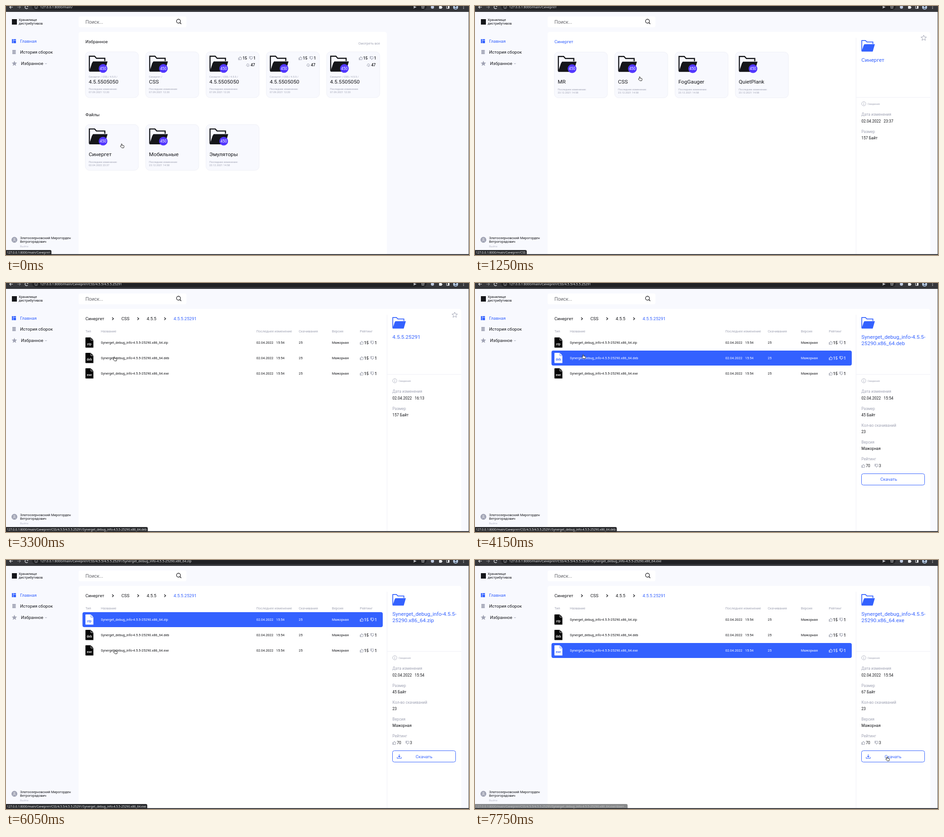
An HTML page with a canvas that plays this animation: 1020x549 px, repeating every 8 s.

```html
<!DOCTYPE html>
<html lang="ru">
<head>
<meta charset="utf-8">
<style>
html, body { margin: 0; width: 100%; height: 100%; overflow: hidden; background: #f8f9fe; }
canvas { display: block; width: 1020px; height: 549px; }
</style>
</head>
<body>
<canvas id="stage" width="1020" height="549"></canvas>
<script>
const ctx = document.getElementById('stage').getContext('2d');
const LOOP = 8000;
const BLUE = '#3361ff', INK = '#15161a', GREY = '#a0a3b4', LINE = '#eff0f7', PALE = '#f8f9fe', VIOLET = '#5237ff';
const ROOT = '127.0.0.1:8000/main/';
const SYN = ROOT + 'Синергет', CSS_DIR = SYN + '/CSS', VER = CSS_DIR + '/4.5.5', BUILD = VER + '/4.5.5.25291';
const TYPES = ['zip', 'deb', 'exe'];
const fileName = type => `Synerget_debug_info-4.5.5-25290.x86_64.${type}`;
const filePath = type => `${BUILD}/${fileName(type)}`;

// Each list holds hard changes: [start time, ...values].
const pages = [
  [0, { home: true, url: ROOT }],
  [600, { crumbs: ['Синергет'], url: SYN, time: '23:37', cards: ['MR', 'CSS', 'FogGauger', 'QuietPlank'], changed: '23.12.2021 14:58' }],
  [2300, { crumbs: ['Синергет', 'CSS'], url: CSS_DIR, time: '15:46', latest: true, cards: ['4.5.5'], changed: '02.04.2022 15:47' }],
  [2500, { crumbs: ['Синергет', 'CSS', '4.5.5'], url: VER, time: '15:47', latest: true, cards: ['4.5.5.25291'], changed: '02.04.2022 16:13' }],
  [3300, { url: BUILD, time: '16:13' }],
  [4150, { url: BUILD, time: '15:54', file: 'deb', size: '45', plainButton: true }],
  [4400, { url: filePath('deb'), time: '15:54', file: 'deb', size: '45' }],
  [5350, { url: filePath('zip'), time: '15:54', file: 'zip', size: '45' }],
  [6400, { url: filePath('exe'), time: '15:54', file: 'exe', size: '67' }]
];
const cursors = [
  [0, 251.5, 303, 'hand'], [650, 253, 303, 'arrow'], [1250, 359.5, 155, 'hand'],
  [2300, 235.5, 162, 'hand'], [3700, 235.5, 160, 'hand'], [3900, 235, 157, 'hand'],
  [4750, 241, 138, 'hand'], [5600, 243.5, 150, 'hand'], [5800, 238.5, 186, 'hand'],
  [6050, 236.5, 197, 'hand'], [7000, 676, 329, 'arrow'], [7250, 828.5, 363, 'arrow'],
  [7500, 907, 419, 'arrow'], [7750, 904.5, 433, 'hand']
];
const statuses = [
  [0, SYN, 1], [1100, CSS_DIR, 1], [2300, VER, 1], [2500, BUILD, 1], [3300, filePath('deb'), 1],
  [4750, filePath('zip'), 1], [5800, filePath('exe'), 1], [7250, filePath('exe'), 0.55],
  [7500, '', 0], [7750, filePath('exe') + '/down...', 0.55]
];
const current = (list, t) => list.filter(item => item[0] <= t).pop();

// y is the middle of the capital letters.
function text(str, x, y, size, color = INK, { align = 'left', weight = 400, family = 'Roboto' } = {}) {
  ctx.font = `${weight} ${size}px ${family}, sans-serif`;
  ctx.textAlign = align;
  ctx.fillStyle = color;
  ctx.fillText(str, x, y + size * 0.355);
  return ctx.measureText(str).width;
}
function rect(x, y, w, h, color) {
  ctx.fillStyle = color;
  ctx.fillRect(x, y, w, h);
}
function box(x, y, w, h, r, fill, stroke) {
  ctx.beginPath();
  ctx.roundRect(x, y, w, h, r);
  paint(fill, stroke);
}
function paint(fill, stroke, width = 1) {
  if (fill) { ctx.fillStyle = fill; ctx.fill(); }
  if (stroke) { ctx.strokeStyle = stroke; ctx.lineWidth = width; ctx.stroke(); }
}
function disc(x, y, r, fill, stroke, width) {
  ctx.beginPath();
  ctx.arc(x, y, r, 0, Math.PI * 2);
  paint(fill, stroke, width);
}
function shape(d, x, y, { fill, stroke, width = 1, sx = 1, sy = sx } = {}) {
  const path = new Path2D(d);
  ctx.save();
  ctx.translate(x, y);
  ctx.scale(sx, sy);
  if (fill) { ctx.fillStyle = fill; ctx.fill(path); }
  if (stroke) { ctx.strokeStyle = stroke; ctx.lineWidth = width; ctx.stroke(path); }
  ctx.restore();
}
function star(x, y, r, fill, stroke) {
  ctx.beginPath();
  for (let i = 0; i < 10; i++) {
    const a = i * Math.PI / 5 - Math.PI / 2, d = i % 2 ? r * 0.45 : r;
    ctx.lineTo(x + d * Math.cos(a), y + d * Math.sin(a));
  }
  ctx.closePath();
  paint(fill, stroke);
}
function folder(x, y, color, scale = 1) {
  shape('M1.5 34V1.5H13L17 6H35.5V12', x, y, { stroke: color, width: 2.4, sx: scale });
  shape('M9.5 13H41.5L35 35.5H1L7 17Z', x, y, { fill: color, sx: scale });
}
function thumb(x, y, down, color) {
  shape('M.5 3.5H2.2V7.7H.5ZM2.2 3.8L4 .5Q5.5.4 5 3H7.7L7 7.5H2.2', x, down ? y + 4 : y - 4,
    { stroke: color, width: 0.75, sx: 1, sy: down ? -1 : 1 });
}
function rating(x, y, up, down, color, iconColor, weight = 500, gap = 24) {
  thumb(x, y, false, iconColor);
  text(up, x + 9.6, y, 8.5, color, { weight });
  thumb(x + gap, y, true, iconColor);
  text(down, x + gap + 9.4, y, 8.5, color, { weight });
}

function drawBrowser(url) {
  rect(0, 0, 1020, 13, '#35363a');
  box(57, -10, 870, 19, 9, '#202124');
  const white = { stroke: '#e8eaed', width: 1.2 };
  shape('M8 0H1M4-3L1 0L4 3', 7, 2.5, white);
  shape('M0 0H7M4-3L7 0L4 3', 25, 2.5, { stroke: '#85878b', width: 1.1 });
  shape('M3 2A3.4 3.4 0 1 1 3-2M3.3-4V-1.5H.8', 45, 2.5, white);
  disc(66.5, 2.5, 3.3, null, '#b5b7bb', 0.8);
  rect(66.1, 2, 0.9, 2.5, '#b5b7bb');
  text(url, 75, 2.7, 7.24, '#e1e3e6', { family: '"Noto Sans"' });
  shape('M0-3L7 0L0 3L1 0Z', 897.5, 2.5, { fill: '#c4c6ca' });
  star(918.5, 2.5, 3.6, null, '#c4c6ca');
  disc(939.5, 2.5, 3.5, '#bfcbe2');
  box(954, 0, 6, 6, 1, '#e8eaed');
  disc(957, 0, 1.5, '#e8eaed');
  disc(960, 3, 1.5, '#e8eaed');
  box(970.5, -0.5, 6, 6, 0.5, null, '#e8eaed');
  rect(973.5, 0, 3, 5, '#e8eaed');
  disc(990.5, 2.5, 5.5, '#b9cce3');
  disc(990.5, 1, 1.9, '#39465c');
  shape('M-3.5 3Q0-1 3.5 3Z', 990.5, 3.5, { fill: '#39465c' });
  for (const y of [0, 2.7, 5.4]) disc(1008, y, 0.8, '#e8eaed');
}

function drawSidebar() {
  rect(13, 29, 11, 12, INK);
  text('Хранилище', 28, 30.8, 7.44);
  text('дистрибутивов', 28, 38, 7.44);
  rect(13, 73, 2.6, 9, BLUE);
  rect(16.4, 73, 5.6, 2.4, BLUE);
  rect(16.4, 76.2, 5.6, 5.8, BLUE);
  text('Главная', 31, 77.5, 9.6, BLUE);
  for (let i = 0; i < 3; i++) rect(14, 97 + i * 3.2, 7.5, 2.6, GREY);
  text('История сборок', 31, 101.5, 9.6);
  star(18.5, 127, 6.2, GREY);
  text('Избранное', 33, 127, 9.6);
  shape('M-2-1L0 1L2-1', 88, 127, { stroke: GREY });
  disc(18.5, 515.5, 6.4, GREY);
  disc(18.5, 513.8, 1.7, null, '#fff', 0.8);
  shape('M-3 2.3Q-2.5 0 0 0T3 2.3', 18.5, 516.7, { stroke: '#fff', width: 0.8 });
  text('Златоозерновский Мирогорден', 31, 511, 7.5);
  text('Ветрогорадович', 31, 519.3, 7.5);
  text('Выйти', 31, 529.5, 6, '#b7b9c8');
}

function drawSearch() {
  box(160, 23, 237.5, 24, 4, '#fff');
  text('Поиск...', 175, 35, 10.5, '#66676d');
  disc(380, 33.5, 4.3, null, INK, 1.2);
  shape('M3 3L6 6.3', 380, 33.5, { stroke: INK, width: 1.3 });
}

function drawCard(col, y, title, changed, { path, rated } = {}) {
  const x = 174.8 + col * 132.9;
  box(x, y, 117, 101, 9, PALE, LINE);
  folder(x + 7.4, y + 8.3, INK);
  disc(x + 39, y + 36.7, 9.6, VIOLET);
  text('450', x + 39, y + 36.8, 8.4, '#fff', { align: 'center' });
  if (path) text(path, x + 7.4, y + 55, 5.84, GREY);
  text(title, x + 7.4, y + 65.5, 11.69);
  text('Последнее изменение:', x + 7.4, y + 82.4, 5.84, GREY);
  text(changed, x + 7.4, y + 89.3, 5.84, GREY);
  if (rated) {
    rating(x + 71, y + 14, '15', '1', INK, '#85889a');
    shape('M2 2.5H1.7Q-.5 1.5 1.3-.3Q2-3.5 4.7-2.5Q6.4-1.8 6.2-.2Q8.6.8 6.5 2.5H6M4 0V3.7M2.8 2.6L4 3.8L5.2 2.6',
      x + 88.3, y + 29, { stroke: '#85889a', width: 0.75 });
    text('47', x + 98.3, y + 29.2, 8.5, INK, { weight: 500 });
  }
}

function drawHome() {
  text('Избранное', 175, 79, 9.6);
  text('Смотреть все', 824, 82.7, 7.44, GREY, { align: 'right' });
  for (let i = 0; i < 5; i++) {
    const isDir = i === 1;
    drawCard(i, 101, isDir ? 'CSS' : '4.5.5505050', '07.09.2021 12:20',
      { path: isDir ? 'Синергет /' : 'Синергет / CSS / 4.5.5 /', rated: i > 1 });
  }
  text('Файлы', 175, 240, 9.6);
  drawCard(0, 261.3, 'Синергет', '02.04.2022 23:37');
  drawCard(1, 261.3, 'Мобильные', '23.12.2021 14:58');
  drawCard(2, 261.3, 'Эмуляторы', '23.12.2021 14:58');
}

function drawCrumbs(crumbs) {
  let x = 175;
  crumbs.forEach((name, i) => {
    const last = i === crumbs.length - 1;
    x += text(name, x, 78.8, 9.6, last ? BLUE : INK);
    if (!last) shape('M-1.5-2.7L1.5 0L-1.5 2.7', x + 19, 78.7, { stroke: INK, width: 1.3 });
    x += 38;
  });
}

function drawTable(selected) {
  const heads = { 175: 'Тип', 209: 'Название', 551.5: 'Последнее изменение', 645: 'Скачивания', 718: 'Версия', 779.5: 'Рейтинг' };
  for (const x in heads) text(heads[x], +x, 106, 7.44, GREY);
  TYPES.forEach((type, i) => {
    const y = 131.6 + i * 34, on = type === selected, color = on ? '#fff' : INK;
    if (on) box(168.5, y - 16.6, 661.5, 33, 4, BLUE);
    shape('M1 0H12L17.5 6V22.5H1Q0 22.5 0 21.5V1Q0 0 1 0Z', 175, y - 11.5, { fill: on ? '#fff' : '#050505' });
    shape('M12 0V6H17.5', 175, y - 11.5, { stroke: on ? BLUE : '#fff', width: 0.8 });
    text(type, 183.5, y + 2.7, 7, on ? BLUE : '#fff', { align: 'center', weight: 500 });
    text(fileName(type), 209, y, 7.44, color);
    text('02.04.2022', 551.5, y, 7.44, color);
    text('15:54', 595, y, 7.44, color);
    text('25', 645, y, 7.44, color);
    text('Мажорная', 718, y, 7.44, color);
    rating(779.5, y, '15', '1', color, on ? '#fff' : '#85889a', 500, 23.3);
  });
}

function drawDetails(page, title) {
  rect(839, 70, 1, 477, LINE);
  rect(839, 201, 164, 1, LINE);
  folder(851, 75, BLUE, 0.72);
  if (page.file) {
    text('Synerget_debug_info-4.5.5-', 851.3, 119.3, 11.69, BLUE);
    text('25290.x86_64.' + page.file, 851.3, 133, 11.69, BLUE);
  } else {
    star(988.5, 70.5, 6.4, null, GREY);
    text(title, 851.3, 119.3, 11.69, BLUE);
  }
  if (page.latest) {
    text('Последняя версия', 851.3, 160, 8.5);
    text('4.5.5.25291', 851.3, 173.3, 8.5, BLUE);
    shape('M3 1H.5V6.5H6V4M4 .5H6.5V3M6.5.5L3 4', 898, 169.5, { stroke: BLUE });
    text('12.08.2021', 851.3, 183.3, 5.84, GREY);
  }
  disc(856.5, 215.5, 4.6, null, GREY, 0.8);
  rect(856.1, 215, 0.9, 3, GREY);
  rect(856.1, 213, 0.9, 1, GREY);
  text('Сведения', 865, 215.7, 5.84, GREY);
  const field = (label, value, y) => {
    text(label, 851.3, y, 8.5, GREY);
    text(value, 851.3, y + 14.4, 8.5);
  };
  field('Дата изменения', '02.04.2022', 239.3);
  text(page.time, 900.3, 253.7, 8.5);
  field('Размер', (page.size || '157') + ' Байт', 276.6);
  if (!page.file) return;
  field('Кол-во скачиваний', '23', 313.8);
  field('Версия', 'Мажорная', 351);
  field('Рейтинг', '', 388.2);
  rating(851.3, 403, '70', '3', INK, '#85889a', 400, 29);
  box(851.5, 420.5, 139, 25, 4, '#fff', BLUE);
  if (page.plainButton) {
    text('Скачать', 911.5, 432.3, 9.6, BLUE, { align: 'center' });
  } else {
    shape('M-4.5 1.5V4.2H4.5V1.5M0-4.5V1.7M-2.2-.5L0 1.7L2.2-.5', 866.3, 433, { stroke: BLUE, width: 1.1 });
    text('Скачать', 921, 433.6, 9.6, BLUE, { align: 'center' });
  }
}

function drawPage(page) {
  rect(0, 0, 1020, 549, PALE);
  drawSidebar();
  drawSearch();
  box(160, 57, page.home ? 679 : 843, 490, [5, 5, 0, 0], '#fff');
  if (page.home) {
    drawHome();
  } else {
    const crumbs = page.crumbs || ['Синергет', 'CSS', '4.5.5', '4.5.5.25291'];
    drawCrumbs(crumbs);
    if (page.cards) page.cards.forEach((name, i) => drawCard(i, 101.5, name, page.changed));
    else drawTable(page.file);
    drawDetails(page, crumbs[crumbs.length - 1]);
  }
  drawBrowser(page.url);
  rect(1019, 13, 1, 536, '#55565a');
  rect(0, 547, 1020, 2, '#36373b');
}

function drawStatus(t) {
  let [, label, alpha] = current(statuses, t);
  if (t >= 900 && t < 1250) alpha = Math.min(1, Math.abs(Math.floor(t / 50) * 50 - 1100) / 150);
  if (!alpha) return;
  ctx.save();
  ctx.globalAlpha = alpha;
  ctx.font = '400 6.62px "Noto Sans", sans-serif';
  box(0, 538, ctx.measureText(label).width + 4.5, 11, [0, 3, 0, 0], '#292a2d');
  text(label, 2, 543.7, 6.62, '#eceef0', { family: '"Noto Sans"' });
  ctx.restore();
}

function drawCursor(t) {
  let [, x, y, kind] = current(cursors, t);
  if (t >= 900 && t < 1250) {
    const p = (Math.floor((t - 900) / 50) + 1) / 8, k = p * p * (3 - 2 * p);
    x = 253 + 106.5 * k;
    y = 303 - 148 * k;
    kind = y < 202 ? 'hand' : 'arrow';
  }
  const hand = 'M2.4 5.5V1.5Q3.3-.1 4.2 1.5V4L7.7 4.7Q9 5 8.6 6.8L7.8 9.8H3.6L.9 7Q0 5.4 1.5 5.3Z';
  const arrow = 'M.5.5V9.2L2.5 7.4L3.9 10.4L5.3 9.7L4 6.9H6.6Z';
  shape(kind === 'hand' ? hand : arrow, x, y, { fill: '#fff', stroke: '#111', width: 0.9 });
}

function frame(now) {
  const t = now % LOOP;
  drawPage(current(pages, t)[1]);
  drawStatus(t);
  drawCursor(t);
  requestAnimationFrame(frame);
}
requestAnimationFrame(frame);
</script>
</body>
</html>
```
